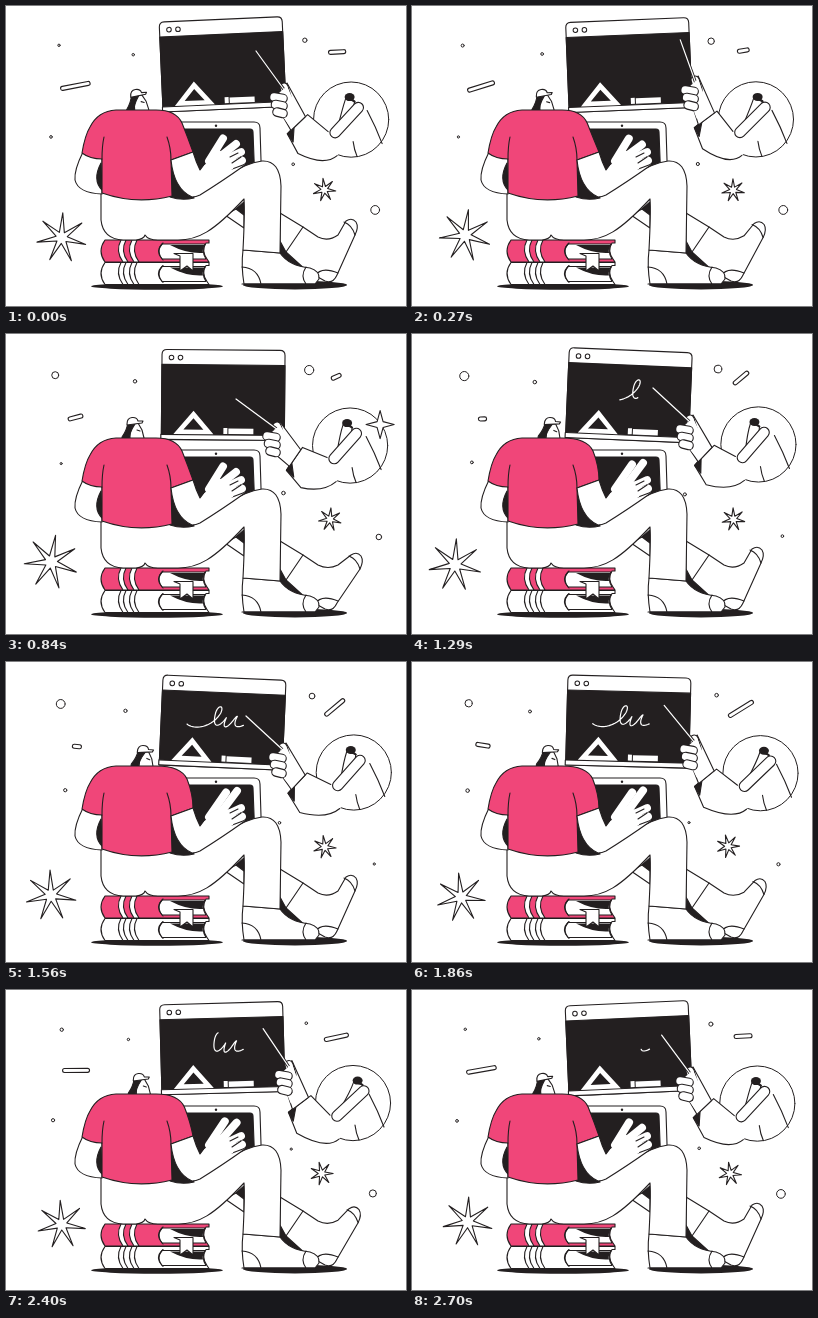
Recreate the animation shown at these times as an HTML page with a canvas. Size 400x300 px, loop 2.73 s.

```html
<!DOCTYPE html>
<html lang="en">
<head>
<meta charset="utf-8">
<title>Online lesson</title>
<style>
  html, body { margin: 0; width: 100%; height: 100%; overflow: hidden; background: #fff; }
  canvas { display: block; width: 400px; height: 300px; }
</style>
</head>
<body>
<canvas id="stage" width="400" height="300"></canvas>
<script>
const ctx = document.getElementById('stage').getContext('2d');
const LOOP = 2730, STEP = 30;
const INK = '#231f20', PINK = '#f04679', WHITE = '#fff';
const poseTimes = [0, 540, 840, 1290, 1560, 2160];
let now = 0;

// One cosine per loop; the peak is given in degrees of the loop.
const wave = (mean, amp, peak) => mean + amp * Math.cos(now / LOOP * 2 * Math.PI - peak * Math.PI / 180);
const clamp = (v) => Math.max(0, Math.min(1, v));

// Smooth periodic curve through one value per pose time.
function pose(...values) {
  const n = values.length;
  const time = (i) => poseTimes[(i + n) % n] + Math.floor(i / n) * LOOP;
  const value = (i) => values[(i + n) % n];
  const slope = (i) => (value(i + 1) - value(i - 1)) / (time(i + 1) - time(i - 1));
  let i = n - 1;
  while (poseTimes[i] > now) i--;
  const span = time(i + 1) - time(i), s = (now - time(i)) / span, r = 1 - s;
  return value(i) * r * r * (1 + 2 * s) + value(i + 1) * s * s * (3 - 2 * s)
    + span * s * r * (slope(i) * r - slope(i + 1) * s);
}

function shape(d, fill, stroke = INK, width = 1.1) {
  const path = new Path2D(d);
  if (fill) { ctx.fillStyle = fill; ctx.fill(path, 'evenodd'); }
  if (stroke) { ctx.strokeStyle = stroke; ctx.lineWidth = width; ctx.stroke(path); }
}
const line = (d, color = INK, width = 1.1) => shape(d, null, color, width);

function oval(x, y, rx, ry = rx, fill = WHITE, stroke = INK) {
  ctx.beginPath();
  ctx.ellipse(x, y, rx, ry, 0, 0, 7);
  ctx.fillStyle = fill;
  ctx.fill();
  if (stroke) { ctx.strokeStyle = stroke; ctx.lineWidth = 1; ctx.stroke(); }
}

// Thick round strokes merged under a single outline.
function limbs(width, ...paths) {
  for (const d of paths) line(d, INK, width + 1.1);
  for (const d of paths) line(d, WHITE, width - 1.1);
}

function placed(x, y, degrees, draw) {
  ctx.save();
  ctx.translate(x, y);
  ctx.rotate(degrees * Math.PI / 180);
  draw();
  ctx.restore();
}

function star(x, y, size, inner, points, turn) {
  placed(x, y, turn, () => {
    let d = '';
    for (let i = 0; i < points * 2; i++) {
      const a = i * Math.PI / points - Math.PI / 2;
      const r = i % 2 ? size * inner : size;
      d += `${i ? 'L' : 'M'}${r * Math.cos(a)},${r * Math.sin(a)}`;
    }
    shape(d + 'Z', WHITE);
  });
}

function capsule(x, y, length, turn) {
  const half = Math.max(0.1, length / 2 - 2);
  placed(x, y, turn, () => limbs(4, `M${-half},0H${half}`));
}

function decorations() {
  star(wave(49.5, 6.5, -20), wave(231.7, 4, 270), wave(25.5, 1.5, 110), 0.23, 7, wave(2, 8, 85));
  star(wave(319.5, 4.5, 105), wave(184.5, 1, 140), 11.5, 0.3, 7, wave(-5, 10, 100));
  oval(wave(369.5, 3.5, 95), wave(203, 1, 20), wave(2.8, 1.7, 20));
  oval(wave(302.5, 3.7, 190), wave(34.5, 1.6, 100), wave(2.9, 1.7, 115));
  oval(wave(53, 4, 270), wave(40.7, 1.4, 180), wave(2.9, 1.7, 180));
  oval(wave(124.5, 6.5, 65), wave(48.5, 1.2, 280), wave(1.5, 0.3, 150));
  oval(wave(52.5, 7.5, 180), wave(129.6, 1.4, 20), wave(1.4, 0.4, 260));
  oval(wave(280, 7.2, 0), wave(159.4, 1.4, 215), wave(1.4, 0.4, 100));
  capsule(wave(70, 1, 230), wave(82.4, 2.5, 175), wave(19, 11, 0), wave(-5, 14, 245));
  capsule(wave(330, 1.3, 30), wave(45.2, 2.4, 290), wave(19, 10, 260), pose(-3, -20, -25, -40, -40, -22));
}

// Chalk writing: cubic curves sampled to points, so that it can be trimmed.
const chalk = (() => {
  const c = [[182, 64], [190, 70], [207, 66], [215, 52], [219, 43], [212, 43], [210, 52],
    [207, 66], [213, 68], [221, 56], [217, 66], [220, 68], [226, 61],
    [229, 57], [231, 54], [232, 54], [228, 62], [229, 68], [240, 62]];
  const points = [];
  for (let i = 0; i + 3 < c.length; i += 3) {
    for (let k = 0; k < 20; k++) {
      const s = k / 20, r = 1 - s;
      points.push([0, 1].map((a) => r * r * r * c[i][a] + 3 * r * r * s * c[i + 1][a]
        + 3 * r * s * s * c[i + 2][a] + s * s * s * c[i + 3][a]));
    }
  }
  return points;
})();

function writing() {
  const end = clamp((now - 900) / 660) ** 1.5;
  const start = now < 1560 ? 0.2 * (1560 - now) / 660 : clamp((now - 1950) / 780) ** 2.4;
  if (end <= start) return;
  const shift = 12 * clamp((1560 - now) / 270);
  const part = chalk.slice(Math.floor(start * chalk.length), Math.ceil(end * chalk.length));
  line('M' + part.map(([x, y]) => `${x + shift},${y}`).join('L'), WHITE, 1.2);
}

function board() {
  placed(216.7 + wave(0, 0.5, 110), 58.7 + wave(0, 1.6, 150), wave(0, -2.6, 10), () => {
    ctx.translate(-217.5, -60);
    shape('M156,106V21Q156,16 161,16H274Q279,16 279,21V106Z', WHITE);
    shape('M156,31H279V101H156Z', INK);
    shape('M155.5,101H280V106H155.5Z', WHITE);
    oval(165.5, 24, 2.3);
    oval(174.5, 24, 2.3);
    shape('M168,100.5L188,77L208,100.5ZM178,96H198L188,84.5Z', WHITE, null);
    shape('M218,94H222V100H218ZM223,94.5H248V100H223Z', WHITE, null);
    writing();
  });
}

function laptop() {
  shape('M165,116H248Q254,116 254,122L255.5,170H165Z', WHITE);
  shape('M170,123H244Q247,123 247,126L248.5,165H170Z', INK);
  oval(210, 119.7, 1.2, 1.2, INK, null);
}

function sparkle(x, y) {
  const grow = (from, to) => now > from && now < to ? Math.sin((now - from) / (to - from) * Math.PI) : 0;
  const size = 14 * Math.min(1, 1.8 * (grow(360, 960) + grow(1950, 2400)));
  if (size > 0.5) star(x, y, size, 0.3, 4, 0);
}

function teacher() {
  const cx = wave(346, 2.5, 250), cy = wave(112, 1.6, 5);
  const headX = pose(-1.5, 5, -3, -4, -3, 8);
  const hx = pose(272, 281, 265, 272, 271, 280), hy = pose(96, 84, 107, 100, 100, 86);
  const tipX = pose(250, 281, 230, 241, 240, 262), tipY = pose(45, 27, 65, 54, 54, 35);

  oval(cx, cy, 37.6);
  placed(cx, cy, 0, () => {
    line('M16,-9Q25,8 31,24M2,22Q3,30 6,37');
    shape(`M${headX - 4},-21Q${headX - 7},-12 -13,6L0,-3L${headX + 5},-18Z`, WHITE);
    oval(headX, -22.5, 5, 4, INK, null);
    line(`M${headX + 1},-21L${headX + 5},-18`, INK, 2);
  });

  // Sleeve follows the line from the fist to the elbow.
  const length = Math.hypot(315 - hx, 145 - hy);
  const ux = (315 - hx) / length, uy = (145 - hy) / length;
  const at = (along, side) => `${hx + ux * along + uy * side},${hy + uy * along - ux * side}`;
  const sleeve = `M${cx - 23},${cy + 12}L${at(29, 14)}L${at(30, -14)}L${at(52, -19)}`
    + `Q${cx - 27},${cy + 47} ${cx - 14},${cy + 36}`;
  shape(`${sleeve}L${cx - 2},${cy + 24}L${cx - 9},${cy + 6}Z`, WHITE, null);
  line(sleeve);
  limbs(10.5, `M${cx - 16},${cy + 13}L${cx + 8 + headX * 0.6},${cy - 12}`);
  shape(`M${at(30, -14)}L${at(29, -4)}L${at(40, -15)}Z`, INK);

  // Forearm and fist
  shape(`M${hx + 9},${hy - 19}L${at(29, 11)}L${at(30, -9)}L${hx + 4},${hy + 13}L${hx},${hy - 8}Z`, WHITE);
  limbs(8, `M${hx + 6},${hy - 15}L${hx + 9},${hy - 5}`);
  const pointer = `M${tipX},${tipY}L${hx + 7},${hy - 11}`;
  line(pointer, INK, 3);
  line(pointer, WHITE, 1.2);
  shape(`M${hx},${hy - 8}L${hx + 9},${hy - 16}L${at(24, 8)}L${at(24, -7)}L${hx + 3},${hy + 12}Z`, WHITE, null);
  for (let i = 0; i < 3; i++) {
    const y = hy - 5 + i * 7.5;
    limbs(8.5, `M${hx - 4 + i * 1.5},${y}L${hx + 5},${y + 1.5}`);
  }
  sparkle(cx + 30, cy - 21);
}

function book(y, cover) {
  placed(0, y, 0, () => {
    shape('M99,0H203V3H200Q195,11 201,19L203,22H99Q91,11 99,0Z', cover);
    shape('M156,4H199Q195,11 200,19H156Q149,11 156,4Z', WHITE);
    shape('M164,5H199Q196,9 197,13Q181,14 164,5Z', INK, null);
    for (const x of [115, 126]) shape(`M${x},0Q${x - 6},11 ${x + 2},22H${x + 7}Q${x - 1},11 ${x + 5},0Z`, WHITE);
    line('M157,3Q149,11 157,20');
  });
}

function backLeg() {
  const k = pose(0, 1, 1, 0, 0, 1);
  const toe = (x, y) => `${x + 5 * k},${y + 6 * k}`;
  shape('M219,209L238,222V198L230,203Z', WHITE);
  shape('M230,203L238,196V209Z', INK);
  shape('M274,232L280,246L303,266L284,264L274,248Z', INK);
  shape(`M274,207L297,221L312,231Q322,236 332,${229 + 2 * k}L${toe(340, 215)}Q${toe(346, 211)} ${toe(350, 216)}`
    + `Q${toe(353, 221)} ${toe(349, 229)}L331,269Q327,278 319,275L301,265L280,246L274,235Z`, WHITE);
  line(`M297,221L280,246M${toe(338, 216)}Q${toe(346, 219)} ${toe(349, 229)}M309,270Q315,260 332,267`);
}

function body() {
  oval(151, 280.3, 66, 3.4, INK, null);
  oval(289, 279, 52, 4.4, INK, null);
  book(256.5, WHITE);
  book(234, PINK);
  shape('M168,247.5H187V265L181,260L174,265V250Z', WHITE);
  backLeg();

  shape('M237,244L274,247Q283,260 304,262Q314,265 313,273L309,278H238Q235,260 237,244Z', WHITE);
  line('M236,261Q252,262 255,278M300,261Q294,270 300,278M236,278H310');
  shape('M95,183L95,214Q97,233 117,234H130Q138,233 139,229Q142,234 152,234H172C192,234 207,226 238,193'
    + 'Q239,205 237,244L274,247L275,180Q274,154 256,155Q240,157 218,171L166,188Z', WHITE);
}

function student() {
  const lean = pose(0, -1, 0, 5, 5, 4);
  const raise = pose(0, 0, 0, 1, 1, 1);

  shape('M77,146Q68,164 69,174Q72,187 96,188V152Z', WHITE);
  shape('M95,157Q86,174 96,184Z', INK);

  // Head
  placed(pose(130, 129, 126, 137, 136, 134), 94, pose(-4, 0, 0, 5, 5, 3), () => {
    shape('M-2,14V-4L6,-5L10,2L12,10V14Z', WHITE);
    shape('M-4,-6Q-5,2 -10,9V13H-3Q-3,5 3,-4Z', INK);
    shape('M-5,-4Q-5,-10 0,-10.5Q5,-11 6,-7L11,-7L10,-5L-5,-3Z', WHITE);
    line('M5,2L8,3');
  });

  shape('M164,154V191Q176,195 188,192L180,150Z', INK);
  shape(`M76,147Q79,129 84,121Q92,105 110,104L150,104Q${170 + lean},104 ${176 + lean},117`
    + `Q${182 + lean},132 187,146L165,154L166,190Q130,199 96,187V153Q84,153 76,147Z`, PINK);
  line('M96,153Q96,140 98,131M165,154Q165,142 161,131');

  // Near arm
  const arm = 'M187,146Q190,156 194,164L205,151L236,148L239,159Q215,176 194,189Q190,191 186,191Q168,183 165,154';
  shape(arm + 'Z', WHITE, null);
  line('M165,154L187,146Q190,156 194,164L203,152M239,159Q215,176 194,189Q190,191 186,191Q168,183 165,154');
  const tip = (x, y, dx, dy) => `${x + dx * raise},${y + dy * raise}`;
  limbs(9,
    `M203,155L${tip(217, 132.5, 3, -2)}`,
    `M216,149L${tip(230, 138, 1, -9)}`,
    'M222,152L235,146',
    'M224,159L236,154.5');
  shape('M196,163L204,152L213,144L219,148L226,147L230,152L227,163L200,178Z', WHITE, null);
  line('M224,151L232,147M226,157L235,151');
}

function draw(ms) {
  now = Math.floor(ms / STEP) * STEP % LOOP;
  ctx.fillStyle = WHITE;
  ctx.fillRect(0, 0, 400, 300);
  ctx.lineCap = ctx.lineJoin = 'round';
  board();
  decorations();
  laptop();
  teacher();
  body();
  student();
}

const begin = performance.now();
function tick() {
  draw(performance.now() - begin);
  requestAnimationFrame(tick);
}
tick();
</script>
</body>
</html>
```
